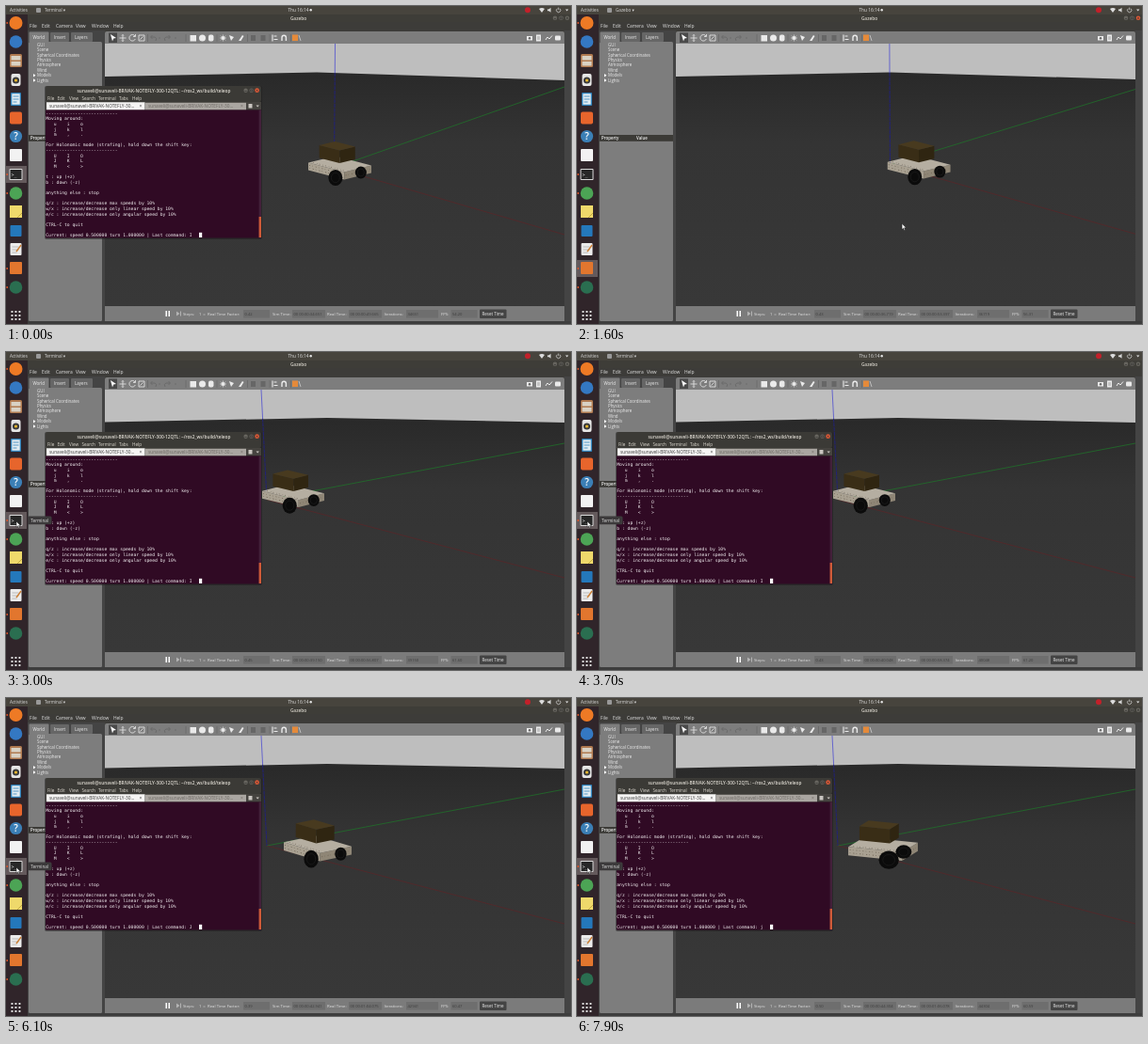
An HTML page that plays this animation: 600x338 px, repeating every 8000 ms.

```html
<!DOCTYPE html>
<html>
<head>
<meta charset="utf-8">
<style>
html, body { margin: 0; width: 100%; height: 100%; overflow: hidden; background: #3d3c39; }
svg { display: block; width: 100vw; height: 100vh; }
text { font-family: "Open Sans", "Noto Sans", sans-serif; white-space: pre; }
.mono { font-family: "DejaVu Sans Mono", monospace; }
.mid { text-anchor: middle; }
.bold { font-weight: 600; }
</style>
</head>
<body>
<svg id="stage" viewBox="0 0 600 338"></svg>
<script>
const LOOP = 8000;
const HOST = "sunaveli@sunaveli-BRIVAK-NOTEFLY-30";

// Markup helpers
const rect = (x, y, w, h, fill, more = "") => `<rect x="${x}" y="${y}" width="${w}" height="${h}" fill="${fill}" ${more}/>`;
const text = (x, y, s, size, fill, more = "") => `<text x="${x}" y="${y}" font-size="${size}" fill="${fill}" ${more}>${s.replace(/</g, "&lt;")}</text>`;
const disc = (x, y, r, fill, more = "") => `<circle cx="${x}" cy="${y}" r="${r}" fill="${fill}" ${more}/>`;
const line = (d, stroke, w = .8, more = "") => `<path d="${d}" fill="none" stroke="${stroke}" stroke-width="${w}" ${more}/>`;
const shape = (pts, fill) => `<polygon points="${pts.map(p => p.map(v => v.toFixed(2))).join(" ")}" fill="${fill}"/>`;
const row = (xs, y, words, size, fill) => words.split(" ").map((w, i) => text(xs[i], y, w, size, fill)).join("");

function topBar() {
  return rect(0, 0, 600, 9, "#47443d") +
    text(4, 6.2, "Activities", 4.6, "#ddd") +
    rect(32, 2, 5, 5, "#999", 'rx="1"') +
    text(41, 6.2, "", 4.6, "#ddd", 'id="app"') +
    text(310.5, 6.2, "Thu 16:14", 4.8, "#e4e4e4", 'class="mid"') + disc(323.7, 4.3, 1.2, "#e4e4e4") +
    disc(554, 4.3, 3, "#c3202a") +
    `<path d="M566 3q3-2 6 0l-3 4z" fill="#ddd"/>` +
    `<path d="M575 3.5h1.5l2-1.7v5l-2-1.6H575z" fill="#ddd"/>` +
    line("M585.3 2.8a2.2 2.2 0 1 0 2.8 0M586.7 1.6v2.6", "#ddd", .7) +
    `<path d="M594 3.5h3.4l-1.7 2z" fill="#ddd"/>`;
}

function dock() {
  const grid = [5.5, 9.5, 13.5].map(x => [324, 328, 332].map(y => rect(x, y, 1.9, 1.9, "#e8e8e8")).join("")).join("");
  return rect(0, 9, 23, 329, "#30252a") +
    rect(0, 170, 22, 18, "#645a5c", 'id="termTile"') + rect(0, 270, 22, 18, "#645a5c", 'id="simTile"') +
    disc(10.5, 18, 7, "#ee7a25") +
    disc(10.5, 38, 6.8, "#3478c2") +
    rect(4, 51, 13, 14, "#b07a50", 'rx="1.5"') + rect(5.5, 53, 10, 4.5, "#d9d2c4") + rect(5.5, 59, 10, 4.5, "#d9d2c4") +
    rect(5.5, 72, 10, 13, "#e6e6e6", 'rx="2"') + disc(10.5, 79, 3.6, "#3b3b3b") + disc(10.5, 79, 1.6, "#e6b62f") +
    rect(5, 92, 11, 14, "#2d7fb8", 'rx="1"') + rect(6.3, 93.3, 8.4, 11.4, "#e3edf3") + line("M7.5 96h6M7.5 99h6M7.5 102h4", "#2d7fb8") +
    rect(4, 112.5, 13, 13, "#e7652c", 'rx="2"') +
    disc(10.5, 138.5, 6.6, "#3b7fb6") + text(10.5, 142.3, "?", 10, "#fff", 'class="mid bold"') +
    rect(4, 152, 13, 13, "#f2f2f2", 'rx="1"') +
    rect(3.5, 173, 14, 12, "#dadada", 'rx="1"') + rect(4.5, 174, 12, 10, "#272727") + text(5.5, 181, ">_", 5, "#eee", 'class="mono"') +
    disc(10.5, 199, 6.8, "#4ca455") +
    rect(4, 212, 13, 13, "#efd96b") + line("M17 220l-5 5", "#b79d35") +
    rect(4.5, 233, 12, 12, "#2478bb", 'rx="1"') +
    rect(4.5, 252, 12, 13, "#ececec", 'rx="1"') + line("M6.5 256h7M6.5 259h7M6.5 262h5", "#999", .6) + line("M16 254l-5 7", "#cc7e33", 1.4) +
    rect(4, 272, 13, 13, "#e2762e", 'rx="1"') +
    disc(10.5, 299, 6.8, "#2a6e50") +
    [18, 179, 199, 279, 299].map(y => disc(1.2, y, .9, "#e2572b")).join("") + grid;
}

function toolbar() {
  const ink = "#eaeaea", dim = "#666";
  return rect(105, 27, 488, 16, "#7d7d7d", 'rx="2"') + rect(109, 28.5, 9, 10.5, "#4a4a4a") +
    `<path d="M111 30l6 4-2.8.5L113 37.5z" fill="#fff"/>` +
    line("M120.5 34h7M124 30.5v7M123 31.5l1-1 1 1M123 36.5l1 1 1-1", ink) +
    line("M137 32a3.3 3.3 0 1 0 .3 3M137.5 30v2.5H135", ink) +
    line("M141 31h6v6h-6zM142.5 35.5l3-3", ink) +
    line("M154 33h4q3 1 1 4M155.5 31l-2 2 2 2M174 33h-4q-3 1-1 4M172.5 31l2 2-2 2", dim) +
    line("M150.5 30v8M191 30v8M224 30v8M256.5 30v8M280 30v8M302.5 30v8", "#5c5c5c", .5) +
    disc(163, 34, .7, dim) + disc(180, 34, .7, dim) +
    rect(195.5, 31, 6.5, 6.5, ink) + disc(208.5, 34, 3.5, ink) + rect(215, 30.5, 5.5, 7, ink, 'rx="2"') +
    disc(230.5, 34, 2, ink) + line("M227 34h7M230.5 30.5v7M228 31.5l5 5M233 31.5l-5 5", ink, .6) +
    `<path d="M237 31l5 2-3 4zM247 37l4-6 1.5 1-3 5z" fill="${ink}"/>` +
    rect(260, 31, 5, 6, dim) + rect(270.5, 31, 5, 6, dim) +
    line("M283 30.5v7M284.5 32h3M284.5 35.5h4", ink, 1.1) + line("M293 37v-3.5a2.2 2.2 0 0 1 4.4 0V37", ink, 1.4) +
    rect(304, 30.5, 6, 6.5, "#e58a3a") + line("M311 31l2 6", ink, .6) +
    rect(553, 32, 6, 4.5, ink) + disc(556, 34.2, 1.2, "#666") + rect(563, 30.5, 5, 7, ink) + line("M564 33h3M564 35h3", "#666", .6) +
    line("M573 36l2-3 2 2 3-3.5", ink, 1) + rect(583, 31.5, 6, 5, ink, 'rx="1"');
}

function sidePanel() {
  const items = ["GUI", "Scene", "Spherical Coordinates", "Physics", "Atmosphere", "Wind", "Models", "Lights"];
  return rect(23, 26, 82, 312, "#444") +
    rect(24.5, 27.5, 21, 11, "#7d7d7d", 'rx="1"') + rect(47, 28, 20, 10, "#666", 'rx="1"') + rect(69, 28, 23, 10, "#666", 'rx="1"') +
    row([28.5, 51, 73], 34.8, "World Insert Layers", 4.5, "#efefef") +
    rect(24, 38, 78, 297, "#7d7d7d", 'rx="1.5"') +
    items.map((s, i) => text(33, 42.7 + i * 5.4, s, 4.4, "#ececec")).join("") +
    `<path d="M29 72l2.5 1.7-2.5 1.7zM29 77.3l2.5 1.7-2.5 1.7z" fill="#fff"/>` +
    rect(24, 137, 78, 6.8, "#3b3a36") +
    text(26, 142.2, "Property", 4.4, "#f2f2f2", 'class="bold"') + text(63, 142.2, "Value", 4.4, "#f2f2f2", 'class="bold"');
}

function statusBar() {
  const label = (x, s) => text(x, 328.8, s, 4.3, "#e2e2e2");
  const field = (x, w, id) => rect(x, 323, w, 8.5, "#6e6e6e") + text(x + 1.5, 328.8, "", 4.1, "#3c3c3c", `id="${id}"`);
  return rect(105, 319, 488, 16, "#7b7b7b") + rect(23, 335, 577, 3, "#3d3d3d") +
    rect(169.5, 324, 1.5, 6, "#fff") + rect(172.5, 324, 1.5, 6, "#fff") +
    `<path d="M181 324.5l3.5 2.5-3.5 2.5zM185 324.5h1v5h-1z" fill="#b5b5b5"/>` +
    label(188, "Steps:") + label(205, "1") + line("M209.5 328h2", "#ccc", .7) +
    label(214, "Real Time Factor:") + field(252, 28, "factor") +
    label(283, "Sim Time:") + field(304, 35, "sim") +
    label(341, "Real Time:") + field(364, 35, "real") +
    label(401.5, "Iterations:") + field(425, 34, "iter") +
    label(462, "FPS:") + field(472.5, 28, "fps") +
    rect(503, 322.5, 28.5, 9.5, "#444", 'rx="1"') + text(517, 328.9, "Reset Time", 4.5, "#eee", 'class="mid"');
}

function terminal() {
  const dashes = "-".repeat(27);
  const lines = [dashes, "Moving around:", "   u    i    o", "   j    k    l", "   m    ,    .", "",
    "For Holonomic mode (strafing), hold down the shift key:", dashes, "   U    I    O", "   J    K    L", "   M    <    >", "",
    "t : up (+z)", "b : down (-z)", "", "anything else : stop", "",
    "q/z : increase/decrease max speeds by 10%", "w/x : increase/decrease only linear speed by 10%",
    "e/c : increase/decrease only angular speed by 10%", "", "CTRL-C to quit"];
  const mono = (i, s, more = "") => text(42.3, (115.6 + i * 5.636).toFixed(2), s, 4.7, "#f4f1f3", `class="mono" ${more}`);
  return `<g id="term">` + rect(41, 85, 231, 163, "#1c1c1c", 'rx="2" opacity=".5"') +
    rect(42, 85, 229, 17, "#3b3a36", 'rx="2"') +
    text(157, 91.5, HOST + "0-12QTL: ~/ros2_ws/build/teleop", 4.75, "#e0dcd4", 'class="mid bold"') +
    disc(254.6, 89.7, 2.2, "#66645e") + disc(260.6, 89.7, 2.2, "#66645e") + disc(266.6, 89.7, 2.4, "#dd5a38") +
    line("M253.6 90.5h2M259.6 88.8h2v2h-2zM265.6 88.7l2 2M267.6 88.7l-2 2", "#222", .5) +
    row([44, 54.5, 67, 80.5, 98, 120, 134], 100.1, "File Edit View Search Terminal Tabs Help", 4.6, "#dfdbd2") +
    rect(42, 102, 229, 8.5, "#45433f") + rect(43, 102.3, 104.5, 8.2, "#f6f5f4") + rect(148, 102.8, 107, 7.7, "#aaa6a1") +
    text(46, 107.8, HOST + "…", 4.75, "#3a3a3a") + text(151, 107.8, HOST + "…", 4.75, "#6d6964") +
    text(141.5, 107.8, "×", 5, "#444") + text(249, 107.8, "×", 5, "#6d6964") +
    rect(257.5, 104, 4, 4.5, "#c9c5c0") + `<path d="M265.5 105.5h3.4l-1.7 2z" fill="#c9c5c0"/>` +
    rect(42, 110.5, 229, 136, "#300a24") +
    lines.map((s, i) => mono(i, s)).join("") + mono(23, "", 'id="command"') +
    text(205, 245.2, ".", 4.7, "#f4f1f3", 'class="mono"') + rect(205, 240.8, 3.2, 5.2, "#fff", 'id="caret"') +
    rect(268.6, 110.5, 2.4, 136, "#43203a") + rect(268.6, 224, 2.4, 22, "#cf5a38") + `</g>`;
}

stage.innerHTML = `<defs><linearGradient id="floor" gradientUnits="userSpaceOnUse" x1="0" y1="70" x2="0" y2="319">
  <stop offset="0" stop-color="#292929"/><stop offset=".3" stop-color="#343434"/><stop offset="1" stop-color="#383838"/></linearGradient></defs>` +
  rect(0, 0, 600, 338, "#3d3c39") + rect(23, 9, 577, 8, "#3e3d38") +
  text(310.5, 14.8, "Gazebo", 4.8, "#d5d1c8", 'class="mid bold"') +
  disc(583, 12.8, 2.3, "#66645e") + disc(589.5, 12.8, 2.3, "#66645e") + disc(596, 12.8, 2.3, "#66645e", 'id="close"') +
  line("M582 13.6h2M588.5 11.9h2v2h-2zM595 11.8l2 2M597 11.8l-2 2", "#222", .5) +
  row([25, 38, 53, 74, 91, 114], 22.9, "File Edit Camera View Window Help", 4.9, "#e2e2e2") +
  sidePanel() + toolbar() + `<g id="world"></g>` +
  rect(593, 26, 7, 309, "#444") + statusBar() + topBar() + dock() + terminal() +
  `<g id="tip">` + rect(23, 174.5, 25.5, 8.8, "#3c3a3b", 'rx="1.5"') + text(35.7, 180.6, "Terminal", 4.6, "#e4e4e4", 'class="mid"') + `</g>` +
  `<path id="pointer" d="M0 0v6.2l1.5-1.3 1 2.2 1-.5-1-2.1h2z" fill="#fff" stroke="#111" stroke-width=".5"/>`;

// Rows of [time, value, ...], interpolated linearly
function track(keys, t) {
  const i = keys.findIndex(k => k[0] > t);
  if (i < 0) return keys[keys.length - 1].slice(1);
  if (i === 0) return keys[0].slice(1);
  const [a, b] = [keys[i - 1], keys[i]], p = (t - a[0]) / (b[0] - a[0]);
  return a.slice(1).map((v, j) => v + (b[j + 1] - v) * p);
}

// x, y, heading in degrees, scale
const POSE = [[0, 354.5, 168, 46, 1], [1300, 380, 172.5, 46, 1], [1500, 380, 172.5, 46, 1], [1950, 305, 149, 44, .98],
  [3700, 305, 149, 44, .98], [4600, 316, 152.5, 44, 1.06], [6000, 331, 155.5, 50, 1.09], [6300, 331, 155.5, 50, 1.09], [7900, 325, 156, 22, 1.12]];
// horizon left, corner x, corner y, right, axis top x, origin x, origin y, green end y, red end y
const VIEW = [[1500, 75, 330, 70.5, 79, 349.5, 348.5, 172, 86, 243], [1950, 74.5, 341, 70, 75, 271, 277, 157, 97, 240]];
const POINTER = [[1300, 361, 234], [1500, 361, 234], [1950, 290, 222], [2250, 11, 180]];
// sim time, real time, speed factor, frame rate
const CLOCK = [[0, 34.65, 49.663, .42, 54.2], [1300, 36.06, 52.604, .41, 53.86], [2300, 38.25, 55.237, .47, 62],
  [3700, 40.047, 58.372, .43, 61.2], [4600, 41.17, 60.32, .46, 60.12], [6100, 42.94, 64.074, .39, 60.47], [7900, 44.304, 66.078, .5, 60.59]];

function robot([x, y, deg, scale]) {
  const c = Math.cos(deg * Math.PI / 180), s = Math.sin(deg * Math.PI / 180);
  const at = (a, b, h) => [x + scale * (a * c - b * s), y + scale * ((a * s + b * c) * .25 - h)];
  const box = (mid, l, w, low, high, top, side, front) => {
    const [r, f] = [mid - l, mid + l];
    return shape([at(r, w, high), at(f, w, high), at(f, w, low), at(r, w, low)], side) +
      shape([at(f, w, high), at(f, -w, high), at(f, -w, low), at(f, w, low)], front) +
      shape([at(r, w, high), at(f, w, high), at(f, -w, high), at(r, -w, high)], top);
  };
  const wheel = (b, drop, r) => {
    const [wx, wy] = at(14, b, -drop), rx = scale * (r * c + 1.5), ry = scale * r;
    return `<ellipse cx="${wx}" cy="${wy}" rx="${rx}" ry="${ry}" fill="#0b0b0b"/>` +
      `<ellipse cx="${wx}" cy="${wy}" rx="${rx * .6}" ry="${ry * .6}" fill="none" stroke="#1d1d1d" stroke-width=".7"/>`;
  };
  const grain = (p, q, dash) => line(`M${p}L${q}`, "#6a5f50", .8, `stroke-dasharray="${dash}"`);
  return box(0, 27.5, 20, -8, 0, "#b5aea1", "#a9a192", "#8f8676") +
    grain(at(-26, 20, -2.5), at(26, 20, -2.5), "1 2.3 .6 3") + grain(at(-26, 20, -5.5), at(26, 20, -5.5), ".7 3 1.2 2") +
    grain(at(27.5, 18, -4), at(27.5, -18, -4), "1 2 .5 3") + grain(at(-24, 16, 0), at(24, 16, 0), ".8 3.2 .5 2") +
    wheel(-17.5, 9.5, 6.5) + wheel(20, 8.5, 8.6) +
    box(-4, 15.5, 11.5, 5, 18.5, "#483a1f", "#392d16", "#2f2511");
}

function drawWorld(t) {
  const [left, cx, cy, right, ax, ox, oy, green, red] = track(VIEW, t);
  const skyY = cy + .6, skyX = ax + (ox - ax) * (skyY - 40) / (oy - 40);
  world.innerHTML = rect(105, 40, 488, 279, "#bebebe") +
    `<path d="M105 ${left}L${cx} ${cy}L593 ${right}V319H105z" fill="url(#floor)"/>` +
    line(`M${ox} ${oy}L593 ${green}`, "#20702a") +
    line(`M${ox} ${oy}L593 ${red}`, "#5c2428", .7) +
    line(`M${ax} 40L${skyX} ${skyY}`, "#4f4fd0", .8) +
    line(`M${skyX} ${skyY}L${ox} ${oy}`, "#202080", .9, 'stroke-dasharray="4 .7"') +
    robot(track(POSE, t));
}

const $ = id => document.getElementById(id);
const show = (id, on) => $(id).setAttribute("visibility", on ? "visible" : "hidden");
const put = (id, s) => { $(id).textContent = s; };
const stamp = s => `00 00:${String(Math.floor(s / 60)).padStart(2, "0")}:${(s % 60).toFixed(3).padStart(6, "0")}`;

function draw(now) {
  const t = now % LOOP, termUp = t < 1500 || t >= 2600, blink = t % 1000;
  drawWorld(t);
  const [sim, real, factor, fps] = track(CLOCK, t);
  put("factor", factor.toFixed(2));
  put("sim", stamp(sim));
  put("real", stamp(real));
  put("iter", Math.round(sim * 1000));
  put("fps", fps.toFixed(2));
  put("app", termUp ? "Terminal ▾" : "Gazebo ▾");
  put("command", `Current: speed 0.500000 turn 1.000000 | Last command: ${t < 6000 ? "I" : t < 6600 ? "J" : "j"}`);
  show("term", termUp);
  show("termTile", termUp);
  show("simTile", !termUp);
  $("close").setAttribute("fill", termUp ? "#66645e" : "#dd5a38");
  show("caret", termUp && (blink < 250 || blink >= 650));
  show("tip", t >= 2500);
  show("pointer", t >= 900);
  $("pointer").setAttribute("transform", `translate(${track(POINTER, t)})`);
}

const start = performance.now();
function tick() {
  draw(performance.now() - start);
  requestAnimationFrame(tick);
}
tick();
</script>
</body>
</html>
```
